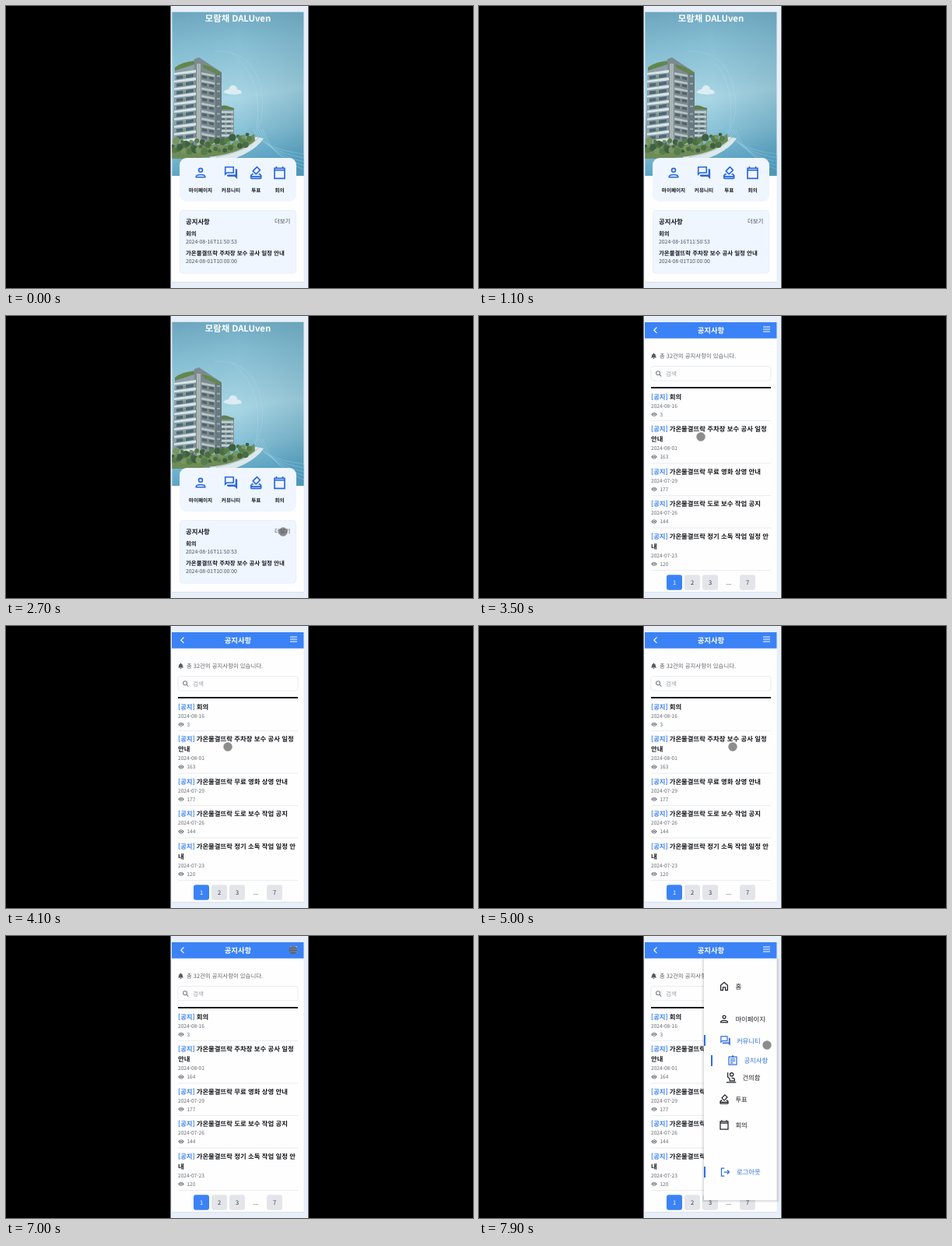
Write an HTML page that moves like this. It is 600x362 px and loops after 8000 ms.

```html
<!DOCTYPE html>
<html lang="ko">
<head>
<meta charset="utf-8">
<title>Notice board walkthrough</title>
<style>
  html, body { margin: 0; width: 100%; height: 100%; overflow: hidden; background: #000; }
  svg { display: block; width: 600px; height: 362px; }
  text { font-family: "Noto Sans CJK KR", "Noto Sans KR", "Noto Sans CJK JP", "Noto Sans", sans-serif; text-rendering: geometricPrecision; }
  .home, .list, .detail, .before, .after, .bar { animation: 8s step-end infinite; }
  .home { animation-name: home; }
  .bar { animation-name: bar; }
  .list { animation-name: list; }
  .detail { animation-name: detail; }
  .before { animation-name: before; }
  .after { animation-name: after; }
  @keyframes home { 0% { visibility: visible } 36.25%, 100% { visibility: hidden } }
  @keyframes bar { 0% { visibility: hidden } 36.25%, 100% { visibility: visible } }
  @keyframes list { 0% { opacity: 0 } 36.25% { opacity: 1 } 64.4% { opacity: 0 } 80.6%, 100% { opacity: 1 } }
  @keyframes detail { 0% { opacity: 0 } 64.4% { opacity: 1 } 80.6%, 100% { opacity: 0 } }
  @keyframes before { 0% { opacity: 1 } 64.4%, 100% { opacity: 0 } }
  @keyframes after { 0% { opacity: 0 } 64.4%, 100% { opacity: 1 } }
  .drawer { animation: drawer 8s infinite; }
  @keyframes drawer {
    0%, 89.5% { transform: translateX(108px); animation-timing-function: ease-out; }
    93.5%, 100% { transform: none; }
  }
  .cursor { animation: move 8s ease-in-out infinite, show 8s step-end infinite; }
  @keyframes show { 0% { opacity: 0 } 23.75%, 100% { opacity: 1 } }
  @keyframes move {
    0%, 26% { transform: translate(281px, 327px); }
    33%, 36.25% { transform: translate(356px, 277px); }
    42.5%, 54% { transform: translate(285px, 155px); }
    60%, 64.4% { transform: translate(326px, 155px); }
    68% { transform: translate(324px, 208px); }
    75.5%, 81% { transform: translate(225px, 17px); }
    87.5%, 91% { transform: translate(369px, 18px); }
    97.5%, 100% { transform: translate(370px, 140px); }
  }
  .press { animation: press 8s infinite; }
  @keyframes press {
    0%, 24% { opacity: .45 } 27%, 34% { opacity: 0 } 35%, 36% { opacity: .45 } 38%, 62.5% { opacity: 0 }
    63.5%, 64.4% { opacity: .45 } 66%, 75% { opacity: 0 } 76.5%, 80% { opacity: .45 } 82%, 87.5% { opacity: 0 }
    89%, 90% { opacity: .45 } 92%, 100% { opacity: 0 }
  }
</style>
</head>
<body>
<svg viewBox="0 0 600 362">
  <defs>
    <linearGradient id="sky" x2=".12" y2="1">
      <stop offset="0" stop-color="#6ba5bd"/><stop offset=".25" stop-color="#86bed3"/>
      <stop offset=".58" stop-color="#a9d6e4"/><stop offset=".8" stop-color="#86c0d6"/>
      <stop offset="1" stop-color="#5aa3c4"/>
    </linearGradient>
    <linearGradient id="shade" x2="1"><stop offset=".5" stop-color="#1c5870" stop-opacity="0"/><stop offset="1" stop-color="#1c5870" stop-opacity=".16"/></linearGradient>
    <linearGradient id="water" x2=".3" y2="1"><stop stop-color="#8cc6da"/><stop offset="1" stop-color="#4d98bc"/></linearGradient>
    <clipPath id="photo"><path d="M213.300 7.800h169.200v210.200h-169.200z"/></clipPath>
    <clipPath id="phone"><path d="M211.500 0h177v362h-177z"/></clipPath>
    <g id="person" fill="none" stroke="currentColor" stroke-width="2">
      <circle cx="12" cy="8" r="3"/><path d="M5 19v-1c0-2 4.700-3 7-3s7 1 7 3v1z"/>
    </g>
    <path id="forum" fill="currentColor" d="M15 4v7H5.200L4 12.200V4zm1-2H3q-1 0-1 1v14l4-4h10q1 0 1-1V3q0-1-1-1zm5 4h-2v9H6v2q0 1 1 1h11l4 4V7q0-1-1-1z"/>
    <path id="vote" fill="currentColor" fill-rule="evenodd" d="M18 13h-.7l-2 2h1.900L19 17H5l1.800-2h2l-2-2H6l-3 3v4q0 2 2 2h14q2 0 2-2v-4zm1 7H5v-1h14zM11.300 15q.7.6 1.400 0l6.400-6.400q.6-.7 0-1.400l-5-5q-.7-.6-1.400 0L6.400 8.700q-.6.700 0 1.400zM13.500 4.400L17 8l-5 5-3.500-3.600z"/>
    <g id="calendar" fill="none" stroke="currentColor" stroke-width="2">
      <path d="M4 5h16v16H4zM4 8h16M7 2v3M17 2v3"/>
    </g>
    <path id="house" fill="none" stroke="currentColor" stroke-width="2" d="M5 10l7-6 7 6v10h-4.500v-6h-5v6H5z"/>
    <g id="board" fill="none" stroke="currentColor" stroke-width="2">
      <path d="M4 4h16v16H4zM7 8.500h10M7 12.500h10M7 16.500h6"/><circle cx="12" cy="3" r="1"/>
    </g>
    <g id="raise" fill="none" stroke="currentColor" stroke-width="2">
      <circle cx="13" cy="6" r="3.500"/><path d="M5 2v9l4 4v4h10v-2q0-4-6-4M2 22h20"/>
    </g>
    <path id="exit" fill="none" stroke="currentColor" stroke-width="2" d="M10 4H4v16h6M9 12h11M16 8l4 4-4 4"/>
    <path id="bell" fill="currentColor" d="M12 1q1.500 0 1.500 2.500Q19 5 19 11q0 4 3 7H2q3-3 3-7 0-6 5.500-7.500Q10.500 1 12 1zM9 20h6q-1 3-3 3t-3-3z"/>
    <path id="eye" fill="currentColor" fill-rule="evenodd" d="M1 12Q5 4 12 4t11 8q-4 8-11 8T1 12zm11-5.500a5.500 5.500 0 1 0 .01 0zm0 2.500a3 3 0 1 1-.01 0z"/>
    <path id="lens" fill="none" stroke="currentColor" stroke-width="3" d="M15.500 15.500L22 22M17 10a7 7 0 1 1-14 0a7 7 0 1 1 14 0z"/>
  </defs>

  <path fill="#000" d="M0 0h600v362H0z"/>
  <g clip-path="url(#phone)">
    <path fill="#e9eff8" d="M211 0h178v362H211z"/>
    <path fill="#dde4ee" d="M213 354h170v1.200H213z"/>
    <path fill="#fefefe" d="M213 8h169.500v346H213z"/>
    <g class="home" id="home">
      <g clip-path="url(#photo)" id="scene"></g>
      <rect x="223" y="195" width="150" height="56" rx="9" fill="#eff6ff"/>
      <rect x="223.500" y="262.500" width="149" height="80.500" rx="4" fill="#eff6ff" stroke="#e3ecf6" stroke-width=".8"/>
    </g>
    <g class="list" id="list"></g>
    <g class="detail" id="detail">
      <path fill="#fdfdfd" stroke="#f0f1f3" stroke-width=".8" d="M217.500 33h161.500v245H217.500z"/>
      <path stroke="#111" stroke-width="2" d="M229 101h138"/>
      <path stroke="#333" stroke-width="1.300" d="M229 227h138M229 265.500h138"/>
    </g>
    <g class="drawer" id="drawer">
      <path fill="#000" opacity=".05" d="M286 29h100v313H286z"/>
      <path fill="#000" opacity=".07" d="M287.500 29h97v311.500h-97z"/>
      <path fill="#fefefe" d="M289 29h93.500v310H289z"/>
      <path fill="#2f6fe0" d="M289 127h2v14h-2zM298 153h2v14h-2zM289 296h2v14h-2z"/>
    </g>
    <g class="bar" id="bar">
      <path fill="#3b82f6" d="M213 8h169.500v20.700H213z"/>
      <path fill="none" stroke="#fff" stroke-width="1.200" d="M228.500 14.500l-3.700 3.700 3.700 3.700M365 14h9M365 17h9M365 20h9"/>
    </g>
    <g class="cursor">
      <circle r="5.500" fill="#555" fill-opacity=".68" stroke="#888" stroke-opacity=".4"/>
      <circle class="press" r="4" fill="#111"/>
    </g>
  </g>
</svg>
<script>
const NS = 'http://www.w3.org/2000/svg';
const $ = id => document.getElementById(id);
const BLUE = '#3b82f6', DEEP = '#2f6fe0', GREY = '#656a71', INK = '#16181c';
const APT = '가온물결뜨락';

function add(parent, tag, attrs) {
  const el = document.createElementNS(NS, tag);
  for (const k in attrs) el.setAttribute(k, attrs[k]);
  return parent.appendChild(el);
}
function text(parent, x, y, size, str, fill = INK, weight = 400, extra = {}) {
  const el = add(parent, 'text', { x, y, 'font-size': size, fill, 'font-weight': weight, ...extra });
  el.textContent = str;
  return el;
}
const mid = { 'text-anchor': 'middle' };
function icon(parent, id, cx, cy, size, color) {
  const s = size / 24;
  add(parent, 'use', { href: '#' + id, color, transform: `translate(${cx - size / 2} ${cy - size / 2}) scale(${s})` });
}
const path = (parent, d, fill, extra) => add(parent, 'path', { d, fill, ...extra });
const line = (parent, d, stroke, w, extra) => path(parent, d, 'none', { stroke, 'stroke-width': w, ...extra });

function drawScene(g) {
  path(g, 'M213 7h170v211H213z', 'url(#sky)');
  path(g, 'M213 7h170v211H213z', 'url(#shade)');
  line(g, 'M268 58Q316 56 327 104T306 178M290 60Q338 98 318 176', '#d8eef5', .7, { opacity: .22 });
  path(g, 'M319 150Q330 183 383 192V218H285V190z', 'url(#water)', { opacity: .6 });
  for (let i = 0; i < 5; i++) line(g, `M${318 + i * 3} 158Q${326 + i * 4} ${183 + i * 3} 383 ${190 + i * 5}`, '#b5deeb', .7, { opacity: .45 });
  path(g, 'M279 111Q282 107 286 107Q288 101 293 102Q297 103 297 107Q303 108 303 112Q292 116 279 111z', '#dcecf3');

  // rear block
  path(g, 'M273 131l11-3 9 4v40h-20z', '#86989d');
  for (let y = 135; y < 166; y += 6) {
    path(g, `M274 ${y}h18v2.500H274z`, '#c3d0d1');
    path(g, `M276 ${y + 3}h5v2h-5zm8 0h5v2h-5z`, '#56707a');
  }
  path(g, 'M273 131q5-5 10-3t10 3v2h-20z', '#5d8050');

  // main tower
  path(g, 'M217 79l25-10 6 5v116H213z', '#8ca0a8');
  path(g, 'M242 68l6-2 29 19v102h-35z', '#7d8b8f');
  path(g, 'M245 74h5v114h-5z', '#a9b4b5');
  path(g, 'M269 81l8 5v101h-8z', '#687a81');
  for (let i = 0; i < 10; i++) {
    const y = 87 + i * 9.700;
    path(g, `M216 ${y - 1}l28-4v3.500l-28 3z`, '#dae4e6');
    path(g, `M219 ${y + 3}l8-1v4l-8 1zm12-1.500l10-1.500v4l-10 1.500z`, '#4d6976');
    path(g, `M227 ${y + 3}h3v3h-3z`, '#7a9472');
    path(g, `M251 ${y - 2}l17 3.500v2.500l-17-3z`, '#bac4c5');
    path(g, `M252 ${y + 2}l6 1v3.500l-6-1zm9 1.500l6 1v3.500l-6-1z`, '#50656e');
    path(g, `M271 ${y + 2}h4v2h-4z`, '#9caaad');
  }
  path(g, 'M217 79q10-8 25-8v4l-25 8zM252 75q13 2 25 12l-5 1-19-9z', '#62864e');

  // road and planting
  path(g, 'M262 204Q315 194 331 170L321 168Q300 178 262 187z', '#dce8ea');
  line(g, 'M270 194Q309 187 325 169', '#a5bcc1', .8);
  path(g, 'M213 178Q240 178 263 180Q300 180 319 164L320 173Q302 188 268 193L240 196H213z', '#6f8c58');
  const greens = ['#3e6040', '#567c49', '#789760', '#4a6d44'];
  for (let i = 0; i < 42; i++) {
    const x = 214 + i * 2.400, r = 2.300 + (i * 7 % 5) * .6;
    const y = 180 + Math.sin(i * 2.300) * 7 - Math.max(0, x - 275) * .27;
    add(g, 'circle', { cx: x, cy: y, r, fill: greens[i % 4] });
  }
}

function drawHome() {
  drawScene($('scene'));
  const g = $('home');
  text(g, 298, 20, 11.3, '모람채 DALUven', '#fff', 700, mid);
  [['person', 250, '마이페이지'], ['forum', 289, '커뮤니티'], ['vote', 321.2, '투표'], ['calendar', 351.5, '회의']]
    .forEach(([id, x, label]) => {
      icon(g, id, x, 214, 19.5, '#2866de');
      text(g, x, 239, 6.6, label, INK, 700, mid);
    });
  text(g, 231, 279.5, 8.4, '공지사항', INK, 700);
  text(g, 345, 279, 7.4, '더보기', '#44494f');
  text(g, 231, 295.3, 7.4, '회의', INK, 700);
  text(g, 231, 305.3, 6.85, '2024-08-16T11:50:53', '#4c535b');
  text(g, 231, 319.5, 7.45, APT + ' 주차장 보수 공사 일정 안내', INK, 700);
  text(g, 231, 329.6, 6.85, '2024-08-01T10:00:00', '#4c535b');
}

function drawList() {
  const g = $('list');
  icon(g, 'bell', 224.5, 51.3, 8.5, '#555b63');
  text(g, 232, 54, 7.4, '총 32건의 공지사항이 있습니다.', '#5c6168');
  add(g, 'rect', { x: 221, y: 64.5, width: 154, height: 18.5, rx: 3, fill: '#fefefe', stroke: '#e8eaee', 'stroke-width': .9 });
  icon(g, 'lens', 230.8, 74, 8.5, '#777c83');
  text(g, 240, 76.5, 7.6, '검색', '#9a9ea5');
  line(g, 'M221 92h154', '#181a1f', 2.2);
  const items = [
    [['회의'], '08-16', 3],
    [[APT + ' 주차장 보수 공사 일정', '안내'], '08-01', 163, 164],
    [[APT + ' 무료 영화 상영 안내'], '07-29', 177],
    [[APT + ' 도로 보수 작업 공지'], '07-26', 144],
    [[APT + ' 정기 소독 작업 일정 안', '내'], '07-23', 120]
  ];
  let y = 106.5;
  for (const [lines, date, views, later] of items) {
    text(g, 221, y, 8.4, '[공지]', BLUE, 700);
    text(g, 244.7, y, 8.4, lines[0], INK, 700);
    if (lines[1]) text(g, 221, y += 13, 8.4, lines[1], INK, 700);
    text(g, 221, y + 11, 6.6, '2024-' + date, GREY);
    icon(g, 'eye', 225, y + 19.8, 8, '#666b72');
    const cls = later ? { class: 'before' } : {};
    text(g, 232.5, y + 22.2, 6.5, views, GREY, 400, cls);
    if (later) text(g, 232.5, y + 22.2, 6.5, later, GREY, 400, { class: 'after' });
    line(g, `M221 ${y + 28}h154`, '#e6e8ec', .8);
    y += 41.5;
  }
  [[241, '1'], [264, '2'], [287, '3'], [311, '...'], [335, '7']].forEach(([x, label], i) => {
    if (i !== 3) add(g, 'rect', { x, y: 332.3, width: 20, height: 19.5, rx: 3, fill: i ? '#e3e5ea' : BLUE });
    text(g, x + 10, 344.8, 7.5, label, i ? '#33373d' : '#fff', 400, mid);
  });
}

function drawDetail() {
  const g = $('detail');
  text(g, 229, 62, 9.4, APT + ' 주차장 보수 공사 일정', INK, 700);
  text(g, 229, 75.3, 9.4, '안내', INK, 700);
  text(g, 229, 90.5, 7.4, '2024-08-01', GREY);
  text(g, 229, 118.3, 7.45, APT + ' 아파트 주차장 보수 공사 일정', '#222');
  text(g, 229, 129.7, 7.45, '안내', '#222');
  text(g, 229, 243.8, 7.6, '첨부파일', '#c6c8cc');
}

function drawDrawer() {
  const g = $('drawer');
  [['house', 315, 64.5, '홈'], ['person', 315, 106.5, '마이페이지'], ['forum', 316.5, 134.5, '커뮤니티', 1],
   ['board', 326, 160, '공지사항', 1], ['raise', 324, 181.5, '건의함'], ['vote', 315, 209.5, '투표'],
   ['calendar', 315, 242.5, '회의'], ['exit', 316.5, 303, '로그아웃', 1]]
    .forEach(([id, x, y, label, active]) => {
      const color = active ? DEEP : '#202329';
      icon(g, id, x, y, 15, color);
      text(g, x + 14.4, y + 3.2, 8.4, label, color);
    });
}

drawHome();
drawList();
drawDetail();
drawDrawer();
text($('bar'), 298, 21.8, 9.4, '공지사항', '#fff', 700, mid);
</script>
</body>
</html>
```
